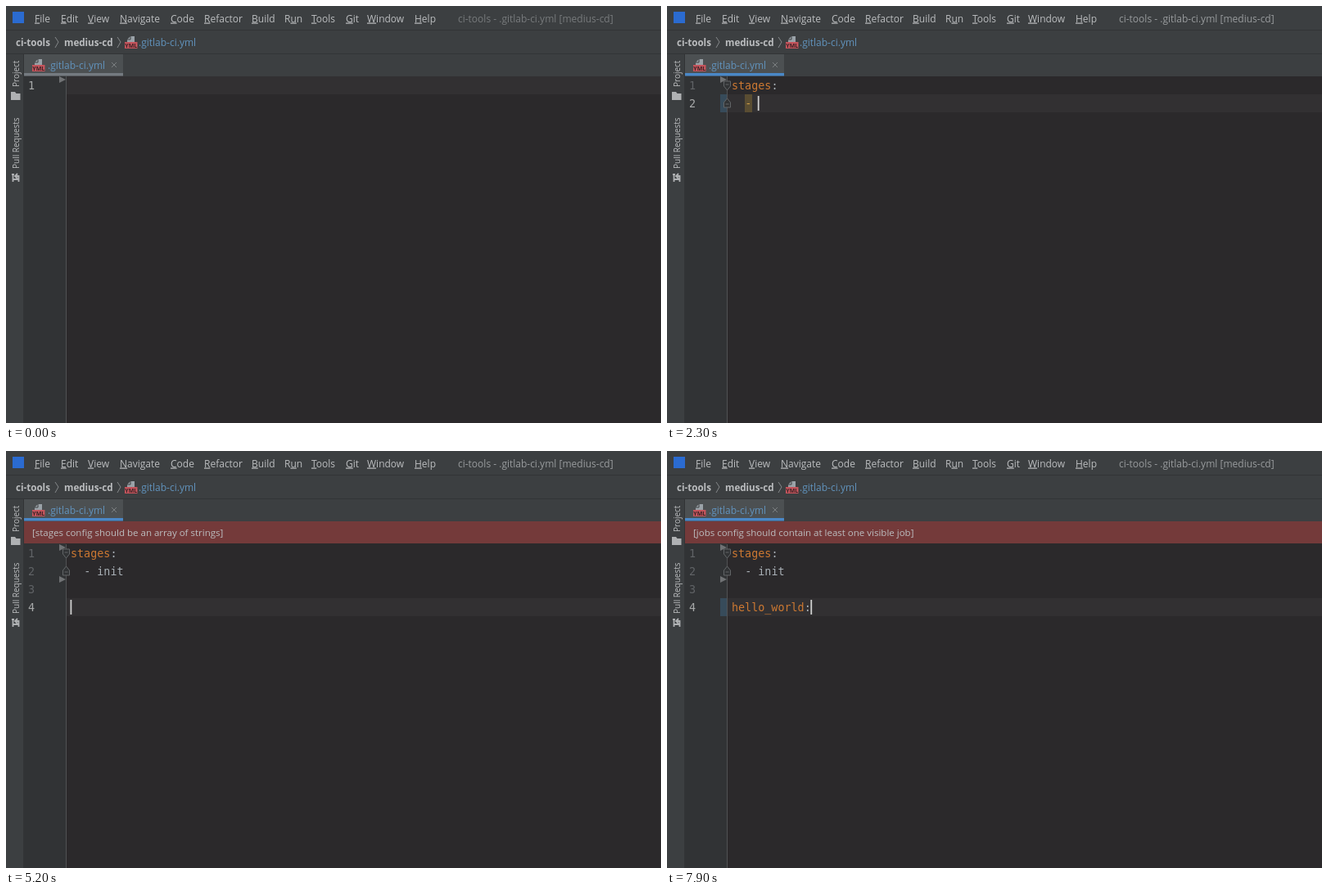
Recreate the animation shown at these times as an HTML page. Size 800 by 510 pixels, loop 8 s.

```html
<!DOCTYPE html>
<html lang="en">
<head>
<meta charset="utf-8">
<title>Editor typing</title>
<style>
  html, body { margin: 0; width: 100%; height: 100%; overflow: hidden; background: #2b292b; }
  svg { display: block; width: 800px; height: 510px; }
  text { white-space: pre; font: 12px "Open Sans", "Noto Sans", sans-serif; fill: #bbbdbf; }
  .mono { font: 13.4px "DejaVu Sans Mono", monospace; fill: #a9b0b6; }
  .crumb { font-size: 11.6px; font-weight: 700; }
  .file { fill: #6193bd; }
  .side { font-size: 10px; }
  .key { text-decoration: underline; }
</style>
</head>
<body>
<svg viewBox="0 0 800 510">
  <defs>
    <g id="yml">
      <path d="M3 8V4L7 0H12V8Z" fill="#9aa2a8"/>
      <path d="M3 4H7V0" fill="none" stroke="#3c3f41"/>
      <rect y="7" width="15.5" height="8" fill="#c4545c"/>
      <text x="7.8" y="13.8" text-anchor="middle" style="font-size:7px;font-weight:700;fill:#3a2427">YML</text>
    </g>
  </defs>
  <rect width="800" height="510" fill="#2b292b"/>
  <rect width="800" height="86" fill="#3c3f41"/>
  <rect y="58" width="21" height="452" fill="#3c3f41"/>
  <rect x="22" y="86" width="51" height="424" fill="#313335"/>
  <path d="M0 29.5H800M0 58.5H800M21.5 58V510" stroke="#323436"/>

  <rect x="8" y="7" width="14" height="14" fill="#2b6bd0"/>
  <g id="menu"></g>
  <text id="title" x="552" y="19.5">ci-tools - .gitlab-ci.yml [medius-cd]</text>

  <text class="crumb" x="12" y="48.5">ci-tools</text>
  <text class="crumb" x="71" y="48.5">medius-cd</text>
  <path d="M60 38L64 44L60 51M136 38L140 44L136 51" fill="none" stroke="#85888a"/>
  <use href="#yml" x="145" y="37"/>
  <text class="file" x="162" y="48.5">.gitlab-ci.yml</text>

  <rect x="22" y="59" width="121" height="24" fill="#4c5052"/>
  <rect id="underline" x="22" y="82" width="121" height="3.5"/>
  <use href="#yml" x="32" y="65"/>
  <text class="file" x="51" y="77">.gitlab-ci.yml</text>
  <path d="M129 69L135 75M135 69L129 75" stroke="#7c8082"/>

  <text class="side" transform="translate(16 99) rotate(-90)">Project</text>
  <path d="M6 105H11L12.5 107H17.5V115H6Z" fill="#afb1b3"/>
  <text class="side" transform="translate(16 199) rotate(-90)">Pull Requests</text>
  <path d="M8.5 205V215M7 206H10M8.5 212H16M15.5 215V208H12M14 205L11 208L14 211" fill="none" stroke="#afb1b3" stroke-width="1.8"/>

  <g id="editor"></g>
</svg>
<script>
const DURATION = 8000, FOCUS = 400, BANNER = 2600, NEW_MESSAGE = 5500;
const LINE = 22, CHAR = 8.07, TEXT_X = 79;
const byId = id => document.getElementById(id);

const menu = [["_File", 35], ["_Edit", 67], ["_View", 100], ["_Navigate", 139], ["_Code", 201],
  ["_Refactor", 242], ["_Build", 300], ["R_un", 340], ["_Tools", 373], ["_Git", 415],
  ["_Window", 441], ["_Help", 499]];
byId("menu").innerHTML = menu.map(([label, x]) =>
  `<text x="${x}" y="19.5">${label.replace(/_(.)/, '<tspan class="key">$1</tspan>')}</text>`).join("");

const edits = [[0, ""]];
const set = (time, text) => edits.push([time, text]);
function type(start, step, chars) {
  let text = edits.at(-1)[1];
  [...chars].forEach((c, i) => set(start + i * step, text += c));
}
type(1100, 100, "stages:");
set(1900, "stages:\n  ");
type(2100, 100, "- ");
type(2400, 100, "init");
set(3500, "stages:\n  - init\n  - ");
set(4300, "stages:\n  - init\n");
set(4800, "stages:\n  - init\n\n");
type(6000, 100, "he");
type(6400, 200, "llo_w");
type(7300, 100, "orld");
type(7800, 100, ":");

const rect = (x, y, w, h, fill) => `<rect x="${x}" y="${y}" width="${w}" height="${h}" fill="${fill}"/>`;
const mono = (col, y, text, fill = "#a9b0b6") =>
  `<text class="mono" x="${TEXT_X + col * CHAR}" y="${y + 16}" style="fill:${fill}">${text}</text>`;
const triangle = y => `<path d="M65 ${y - 4}L73 ${y}L65 ${y + 4}Z" fill="#707274"/>`;
const fold = (y, dir) =>
  `<path transform="translate(73.5 ${y}) scale(1 ${dir})" d="M-4 -5H4V1L0 6L-4 1ZM-2 -1H2" fill="#313335" stroke="#626567"/>`;

function codeLine(line, y, current) {
  if (/^\w+:$/.test(line))
    return mono(0, y, line.slice(0, -1), "#cc7832") + mono(line.length - 1, y, ":");
  if (!line.startsWith("  -")) return mono(0, y, line);
  const marked = current && line.length > 3;
  return (marked ? rect(95, y, 9, LINE, "#5a4d32") : "") +
    mono(2, y, "-", marked ? "#c99a4a" : undefined) + mono(4, y, line.slice(4));
}

function editor(t) {
  const [changed, text] = edits.findLast(([time]) => time <= t);
  const lines = text.split("\n"), last = lines.length - 1;
  const banner = t >= BANNER;
  const top = banner ? 114 : 86;
  const lineY = i => top + i * LINE;
  const y = lineY(last);
  const unsaved = (t >= 1100 && t < 2800) || (t >= 3500 && t < 4300) || t >= 6000;
  const foldEnd = lines.findLastIndex(l => l.startsWith("  -"));

  let out = rect(74, y, 726, LINE, "#323032");
  if (banner) {
    const message = t < NEW_MESSAGE ? "stages config should be an array of strings"
      : "jobs config should contain at least one visible job";
    out += rect(22, 86, 778, 27, "#743a3a") +
      `<text x="32" y="104" style="font-size:11.5px">[${message}]</text>`;
  }
  if (unsaved) out += rect(65, y, 8, LINE, "#374b5a");
  out += `<path d="M73.5 ${top}V510" stroke="#505254"/>`;
  if (!unsaved || last > 0) out += triangle(top + 4);
  if (t >= 2800 && foldEnd === 1) out += triangle(lineY(2) - 1);
  if (foldEnd > 0) out += fold(top + 11, 1) + fold(lineY(foldEnd) + 11, -1);

  lines.forEach((line, i) => {
    const color = i === last ? "#a9abab" : "#606366";
    out += `<text class="mono" x="27" y="${lineY(i) + 16}" style="fill:${color}">${i + 1}</text>`;
    out += codeLine(line, lineY(i), i === last);
  });

  const since = t - Math.max(changed, FOCUS);
  if (since >= 0 && since % 1000 < 500)
    out += rect(TEXT_X + lines[last].length * CHAR - 0.5, y + 2, 1.8, 18, "#d0d0d0");
  return out;
}

function draw(t) {
  const focused = t >= FOCUS;
  byId("title").style.fill = focused ? "#989b9d" : "#777a7c";
  byId("underline").setAttribute("fill", focused ? "#4a88c7" : "#747a80");
  byId("editor").innerHTML = editor(t);
}

const start = performance.now();
function tick() {
  draw((performance.now() - start) % DURATION);
  requestAnimationFrame(tick);
}
tick();
</script>
</body>
</html>
```
